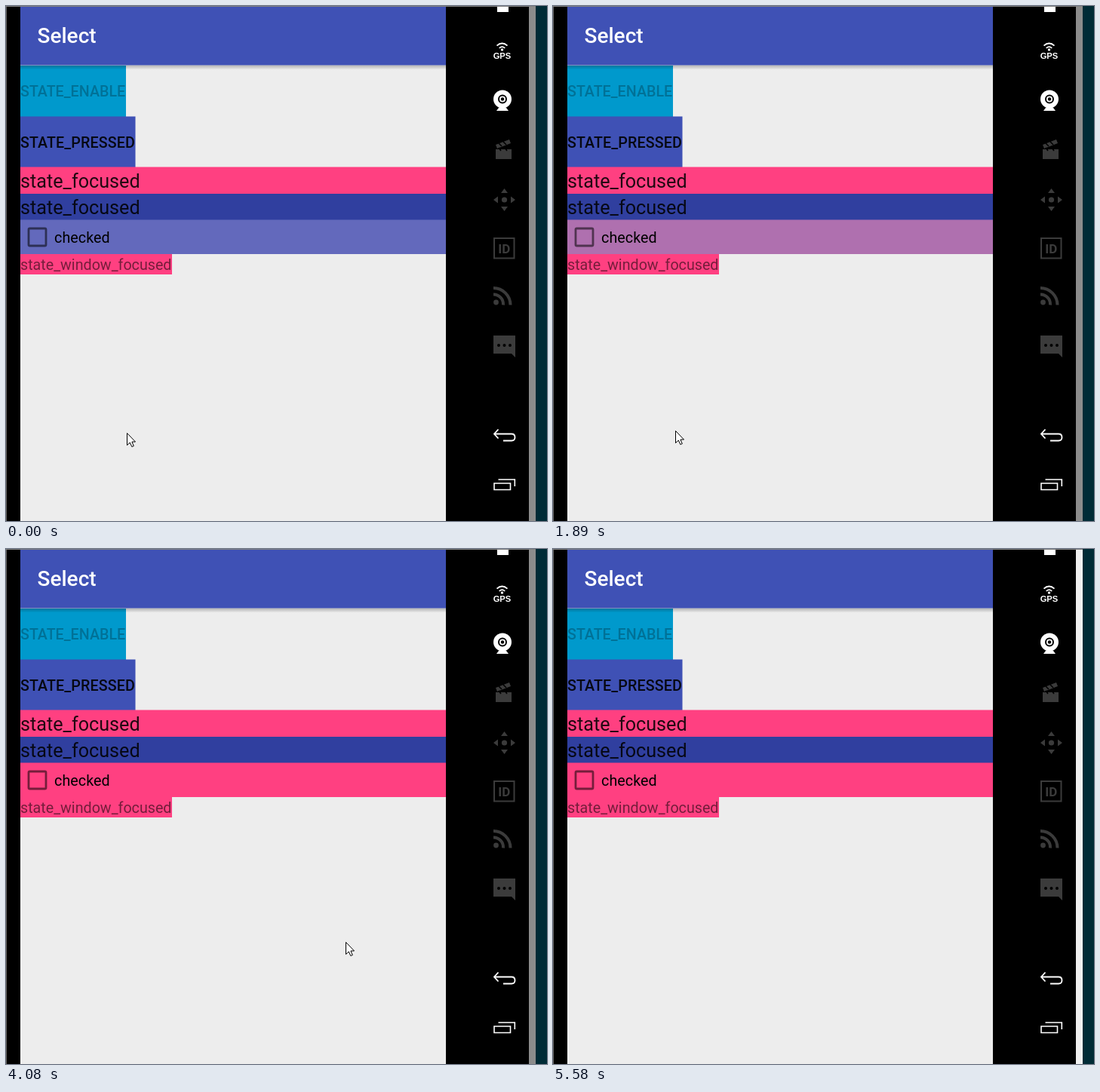
Write an HTML page that moves like this. It is 717 px wide and 683 px high and loops after 5.68 s.

```html
<!DOCTYPE html>
<html lang="en">
<head>
<meta charset="utf-8">
<title>Select</title>
<style>
  html, body { margin: 0; width: 100%; height: 100%; overflow: hidden; background: #000; }
  svg { display: block; width: 717px; height: 683px; }
  text { font-family: Roboto, sans-serif; font-size: 19.7px; }
  .medium { font-weight: 500; }
  .field { font-size: 25.2px; fill-opacity: .87; }
  .line { fill: none; stroke-width: 2; }
</style>
</head>
<body>
<svg viewBox="0 0 717 683">
  <defs>
    <linearGradient id="shade" x2="0" y2="1">
      <stop stop-opacity=".25"/>
      <stop offset="1" stop-opacity="0"/>
    </linearGradient>
  </defs>
  <rect width="717" height="683"/>
  <rect width="1" height="683" fill="#666"/>

  <!-- app screen -->
  <rect x="19" width="564" height="683" fill="#ededed"/>
  <rect x="19" y="79" width="140" height="68" fill="#0099cc"/>
  <rect x="19" y="146.5" width="152.5" height="68" fill="#3f51b5"/>
  <rect x="19" y="213.5" width="564" height="36" fill="#ff4081"/>
  <rect x="19" y="249" width="564" height="35" fill="#303f9f"/>
  <rect id="bar" x="19" y="283.5" width="564" height="45.5"/>
  <rect x="19" y="329" width="201" height="27" fill="#ff4081"/>
  <rect x="19" y="78.5" width="564" height="6" fill="url(#shade)"/>
  <rect x="19" y="1" width="564" height="77.5" fill="#3f51b5"/>
  <text class="medium" x="41.5" y="49" style="font-size:28px" fill="#fff">Select</text>
  <text class="medium" x="19" y="120" fill-opacity=".26">STATE_ENABLE</text>
  <text class="medium" x="19" y="188.3" style="letter-spacing:.12px" fill-opacity=".9">STATE_PRESSED</text>
  <text class="field" x="19" y="241">state_focused</text>
  <text class="field" x="19" y="276">state_focused</text>
  <rect x="30" y="295" width="23" height="23" rx="1.5" fill="none" stroke="#000" stroke-opacity=".54" stroke-width="2.8"/>
  <text x="64" y="313.6" style="letter-spacing:.08px">checked</text>
  <text x="19" y="350" fill-opacity=".54">state_window_focused</text>

  <!-- emulator toolbar -->
  <rect id="hover" x="628" width="65" height="65" fill="#303030"/>
  <g fill="#fff" stroke="#fff" stroke-width="0">
    <rect x="651" width="15" height="8"/>
    <circle cx="657.5" cy="58" r="1.7"/>
    <path class="line" d="M653.8 55.8Q657.5 52.4 661.2 55.8M650.5 52.6Q657.5 46.4 664.5 52.6" style="stroke-width:1.8"/>
    <text x="657.5" y="70" text-anchor="middle" style="font:bold 11.2px 'Liberation Sans',sans-serif">GPS</text>
    <circle cx="658" cy="123.5" r="12"/>
    <path d="M650 139L653 135H663L666 139Z"/>
    <circle class="line" cx="658" cy="123.5" r="5" stroke="#000"/>
    <circle cx="658" cy="123.5" r="2.2" fill="#000"/>
  </g>
  <g fill="#3b3b3b" stroke="#3b3b3b" stroke-width="0">
    <path d="M649 190H670V203H649ZM649 184L667 177L669 182L651 189Z"/>
    <path d="M653 182L657 186M659 180L663 184M653 188L656 192M661 188L664 192" stroke="#000" stroke-width="1.6"/>
    <circle cx="660.5" cy="257" r="3.6"/>
    <path d="M660.5 242L665 248H656ZM660.5 272L665 266H656ZM646 257L652 252.5V261.5ZM675 257L669 252.5V261.5Z"/>
    <rect class="line" x="647" y="308" width="26.5" height="26.5"/>
    <text x="660.3" y="327.5" text-anchor="middle" style="font:bold 17px Roboto,sans-serif">ID</text>
    <circle cx="649.5" cy="393" r="3.4"/>
    <path class="line" d="M646 382.5A13 13 0 0 1 659 396.5M646 374A22.5 22.5 0 0 1 668.5 396.5" style="stroke-width:4"/>
    <path d="M646 437H675V466L670 461H646Z"/>
    <path d="M653 450H668.1" stroke="#000" stroke-width="4" stroke-linecap="round" stroke-dasharray="0 7.5"/>
  </g>
  <path class="line" d="M652.5 561.5L647 567.5L652.5 573.5M647 567.5H670Q674.5 567.5 674.5 572T670 576.5H659" stroke="#fff" style="stroke-width:1.8"/>
  <path id="recents" class="line" d="M647 633H668.5V641.5H647ZM652.5 628H674.3V637" style="stroke-width:1.6"/>

  <rect id="edge" x="693" width="9" height="683"/>
  <rect x="702" width="15" height="683" fill="#002b36"/>
  <rect width="702" height="1" fill="#808080"/>
  <path id="cursor" d="M.5 .5V16.5L4.3 13L6.8 18.5L9.3 17.5L6.9 12H11.5Z" fill="#fff" stroke="#000"/>
</svg>
<script>
const LOOP = 5680, STEP = 128; // the screen refreshes once per STEP ms
const $ = id => document.getElementById(id);

// cursor turning points: step, x, y
const turns = [
  [0, 160, 566], [3, 163, 581], [11, 163, 580], [17, 162, 554], [20, 164, 548],
  [21, 174, 524], [24, 265, 483], [27, 348, 498], [32, 450, 521], [34, 528, 558],
  [37, 644, 666], [39, 720, 740]
];
const indigo = [63, 81, 181], pink = [255, 64, 129], page = 237;
const mix = (a, b, u) => a + (b - a) * u;

function cursorAt(n) {
  const i = turns.findIndex(p => p[0] > n);
  if (i < 0) return turns.at(-1).slice(1);
  const [a, b] = [turns[i - 1], turns[i]];
  const u = (n - a[0]) / (b[0] - a[0]);
  return [1, 2].map(k => Math.round(mix(a[k], b[k], u)));
}

// Pink fades in over the page while indigo fades out on top of it.
function barColor(n) {
  const u = Math.min(1, .2 + n * .027);
  return `rgb(${pink.map((p, i) => Math.round(mix(indigo[i], mix(page, p, u), u)))})`;
}

function draw(t) {
  const n = Math.floor(t / STEP + .25);
  const onRecents = n === 37, onNext = n === 38;
  $('cursor').setAttribute('transform', `translate(${cursorAt(n)})`);
  $('bar').setAttribute('fill', barColor(n));
  $('hover').setAttribute('y', onNext ? 667 : 602);
  $('hover').setAttribute('visibility', onRecents || onNext ? 'visible' : 'hidden');
  $('recents').setAttribute('stroke', onRecents ? '#e91e63' : '#fff');
  $('edge').setAttribute('fill', t >= 5580 ? '#f0f0f0' : '#8c8c8c');
}

const start = performance.now();
function tick() {
  draw((performance.now() - start) % LOOP);
  requestAnimationFrame(tick);
}
tick();
</script>
</body>
</html>
```
